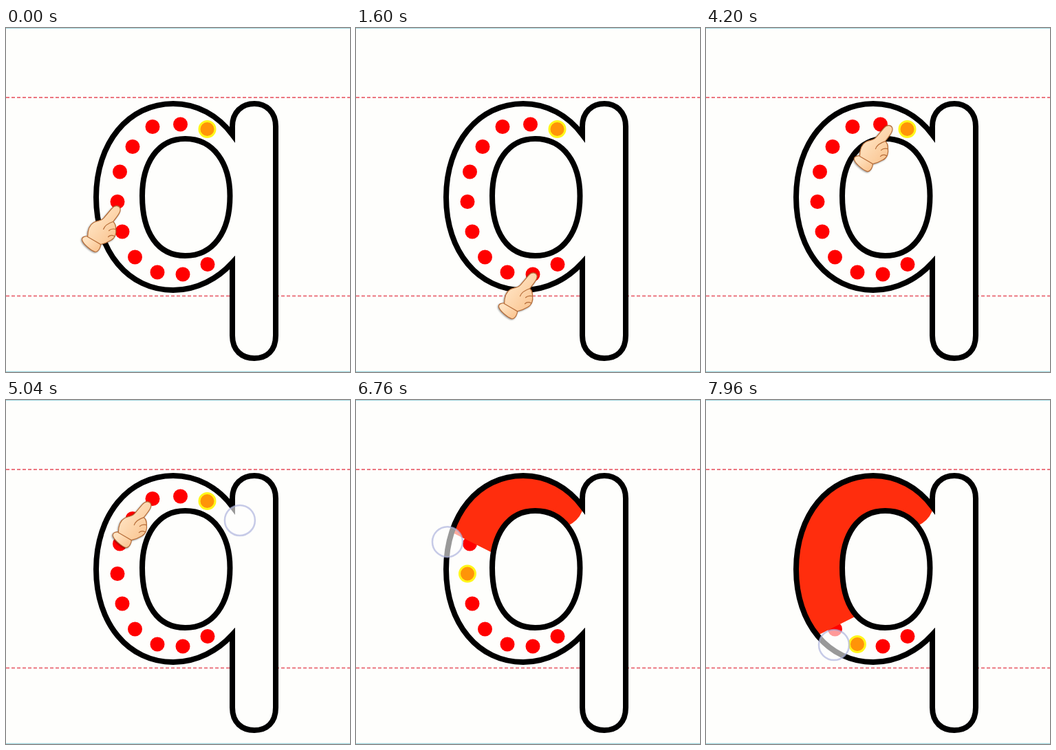
An HTML page that plays this animation: 500 px wide and 500 px high, repeating every 8 s.

```html
<!DOCTYPE html>
<html lang="en">
<head>
<meta charset="utf-8">
<title>Trace the letter q</title>
<style>
  html, body { margin: 0; width: 100%; height: 100%; overflow: hidden; background: #fefefc; }
  svg { display: block; width: 100vw; height: 100vh; }
  .rule { stroke: #ec7680; stroke-width: 2; stroke-dasharray: 5 3; }
  .edge { stroke: #a5d8e0; stroke-width: 1.5; }
  .outline { stroke: #000; stroke-width: 8; }
  #hand { filter: drop-shadow(-1px 1px 1px rgba(0, 0, 0, .4)); }
  #hand path { stroke: #b56c38; stroke-width: 1.2; stroke-linejoin: round; stroke-linecap: round; }
</style>
</head>
<body>
<svg viewBox="0 0 500 500">
  <defs>
    <path id="letter" d="M329 155C308 127 278 110 243 110C178 110 131 167 131 246C131 325 178 381 243 381C278 381 308 364 329 341V447C329 469 343 480 361 480C379 480 392 469 392 447V143C392 122 378 110 361 110C343 110 329 122 329 143Z"/>
    <clipPath id="inside"><use href="#letter"/></clipPath>
    <linearGradient id="skin" x1="0" y1="0" x2="1" y2="1">
      <stop offset=".25" stop-color="#ffe2c0"/>
      <stop offset="1" stop-color="#f9bf88"/>
    </linearGradient>
  </defs>
  <path class="edge" d="M0 .3H500M0 499.5H500"/>
  <path class="rule" d="M0 101H500M0 389.5H500"/>
  <use href="#letter" fill="#fefefc"/>
  <g id="dots"></g>
  <g clip-path="url(#inside)">
    <circle id="fillStart" cx="292.5" cy="147" r="39" fill="#ff2d0d"/>
    <path id="fill" fill="none" stroke="#ff2d0d" stroke-width="80" stroke-linejoin="round"/>
  </g>
  <path class="outline" fill="#fefefc" d="M260.5 161C302 161 325.5 197 325.5 244C325.5 297 301 331 260.5 331C220 331 198 297 198 244C198 197 220 161 260.5 161Z"/>
  <use class="outline" href="#letter" fill="none"/>
  <g id="hand">
    <path fill="url(#skin)" d="M-41 41C-46 41-51 42-50 47C-48 53-37 62-31 64C-26 64-23 57-23 53Z"/>
    <path fill="url(#skin)" d="M-7 1C-3-4 3-4 5 0S4 9-5 20C-1 23-1 27-1 31C0 37-2 44-8 47C-13 50-18 52-23 53L-42 42C-42 34-40 25-33 21C-27 18-22 19-18 14Z"/>
    <path fill="none" d="M-5 20C-11 22-17 25-19 31M-1 31C-5 30-9 31-11 33M-3 41C-7 39-10 40-12 42"/>
  </g>
  <circle id="cursor" r="22" fill="#fff" fill-opacity=".6" stroke="#aab0dc" stroke-opacity=".65" stroke-width="2.5"/>
</svg>
<script>
const LOOP = 8000, HAND_STOP = 2800, HAND_RESTART = 3240, TOUCH = 5281;
const FILL_SPEED = 0.1075, HAND_DECEL = 2.47e-5, HAND_ACCEL = 2.7e-5;
const $ = id => document.getElementById(id);

const dots = [[292.5, 147], [253.5, 140], [213, 143.5], [184, 172.5], [165.5, 209], [162, 252.5],
  [169, 296], [187.5, 333], [220, 355], [257, 358], [293, 343.5]];

// time, x, y
const cursorKeys = [[5040, 340, 175], [5290, 292, 143], [5700, 243, 117], [6100, 196, 123],
  [6420, 161, 153], [6760, 133, 206], [7160, 130, 260], [7560, 147, 313], [7960, 186, 356]];

$('fill').setAttribute('d', `M${dots.join('L')}`);
const length = $('fill').getTotalLength();

const dotNodes = dots.map(([x, y]) => {
  const node = document.createElementNS('http://www.w3.org/2000/svg', 'circle');
  node.setAttribute('cx', x);
  node.setAttribute('cy', y);
  $('dots').append(node);
  return node;
});

function setDot(node, active) {
  node.setAttribute('r', active ? 11.5 : 10.5);
  node.setAttribute('fill', active ? '#ff9408' : '#ff0000');
  node.setAttribute('stroke', active ? '#fff61a' : 'none');
  node.setAttribute('stroke-width', 3);
}

function handDistance(t) {
  if (t < HAND_STOP) return length - HAND_DECEL * (HAND_STOP - t) ** 2;
  if (t < HAND_RESTART) return length;
  return HAND_ACCEL * (t - HAND_RESTART) ** 2;
}

// Catmull-Rom interpolation between the keys
function cursorPosition(t) {
  const last = cursorKeys.length - 1;
  if (t <= cursorKeys[0][0]) return cursorKeys[0].slice(1);
  if (t >= cursorKeys[last][0]) return cursorKeys[last].slice(1);
  const i = cursorKeys.findIndex(k => k[0] > t) - 1;
  const [a, b, c, d] = [i - 1, i, i + 1, i + 2].map(n => cursorKeys[Math.max(0, Math.min(last, n))]);
  const u = (t - b[0]) / (c[0] - b[0]);
  return [1, 2].map(k => b[k] + u / 2 * (c[k] - a[k]
    + u * (2 * a[k] - 5 * b[k] + 4 * c[k] - d[k] + u * (3 * (b[k] - c[k]) + d[k] - a[k]))));
}

function draw() {
  const t = performance.now() % LOOP;
  const touched = t >= TOUCH;
  const filled = touched ? (t - TOUCH) * FILL_SPEED : 0;

  const tip = $('fill').getPointAtLength(handDistance(t));
  $('hand').setAttribute('transform', `translate(${tip.x - 2.5} ${tip.y + 2})`);
  $('hand').style.display = touched ? 'none' : '';

  $('fill').style.display = $('fillStart').style.display = touched ? '' : 'none';
  $('fill').setAttribute('stroke-dasharray', `${filled} 1000`);
  const next = touched ? Math.floor((filled + 10) / length * 10) + 1 : 0;
  dotNodes.forEach((node, i) => setDot(node, i === next));

  const [x, y] = cursorPosition(t);
  $('cursor').setAttribute('transform', `translate(${x} ${y})`);
  $('cursor').setAttribute('opacity', Math.max(0, Math.min(1, (t - 4800) / 160)));
  requestAnimationFrame(draw);
}
draw();
</script>
</body>
</html>
```
